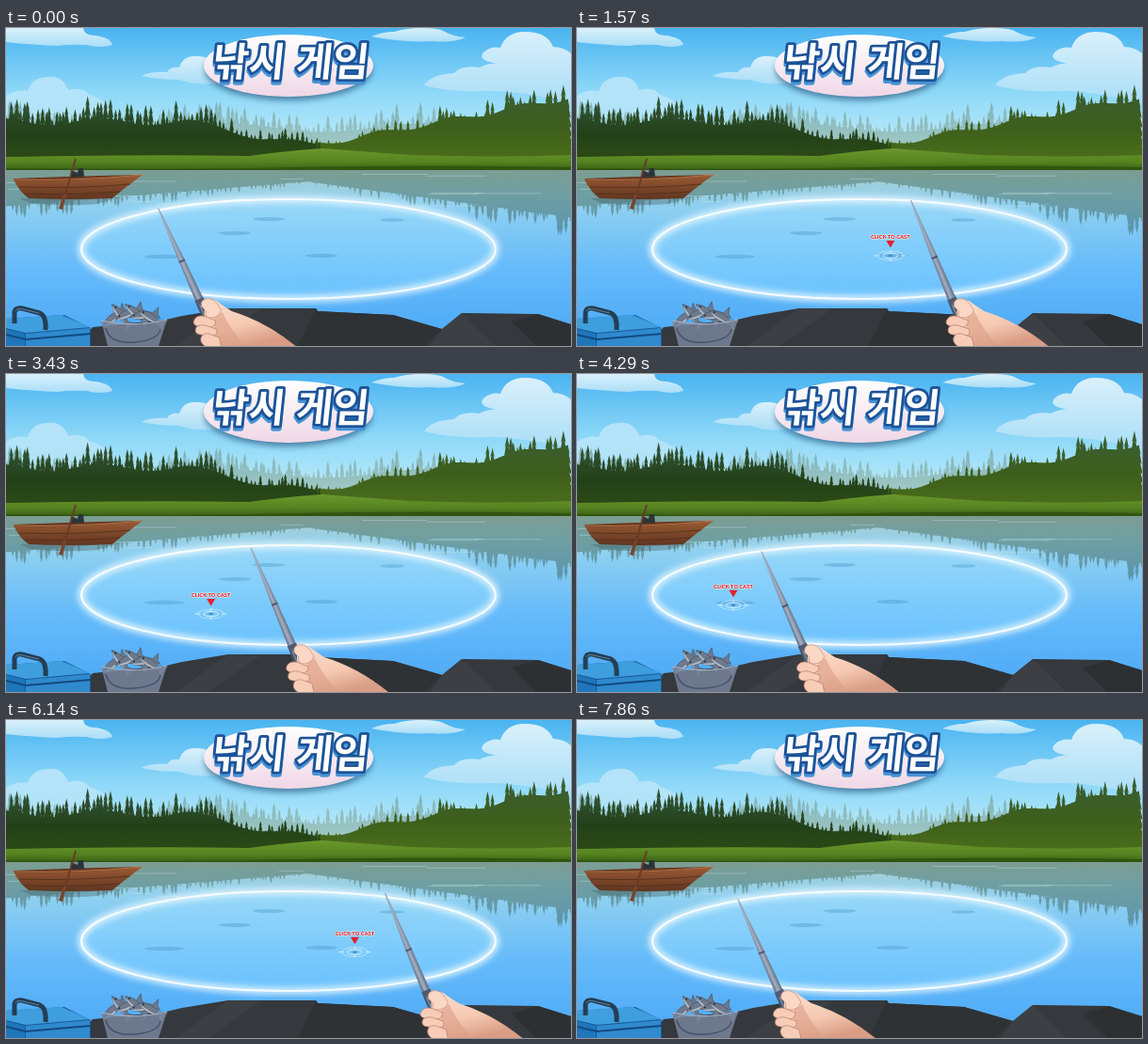
These frames come from a looping animation (600 by 338 pixels, 8.01 s). An HTML page:

```html
<!DOCTYPE html>
<html lang="ko">
<head>
<meta charset="utf-8">
<title>낚시 게임</title>
<style>
html, body { margin: 0; width: 100%; height: 100%; overflow: hidden; background: #62b8f8; }
svg { display: block; width: 100%; height: 100%; }
.title { font: 900 42px "Noto Sans CJK KR", "Noto Sans CJK", sans-serif; text-anchor: middle; stroke-linejoin: round; paint-order: stroke; }
.hint { font: 900 5.8px Lato, sans-serif; text-anchor: middle; fill: #e51f2b; stroke: #fff; stroke-width: .9px; stroke-linejoin: round; paint-order: stroke; }
</style>
</head>
<body>
<svg viewBox="0 0 600 338" preserveAspectRatio="none">
<defs>
  <linearGradient id="sky" x2="0" y2="1"><stop stop-color="#4ab4f1"/><stop offset=".45" stop-color="#8ed8f8"/><stop offset="1" stop-color="#d0f3fb"/></linearGradient>
  <linearGradient id="cloud" x2="0" y2="1"><stop stop-color="#d9f0fb"/><stop offset="1" stop-color="#a9def7"/></linearGradient>
  <linearGradient id="haze" x2="0" y2="1"><stop stop-color="#7eb0b6"/><stop offset="1" stop-color="#a9d0c9"/></linearGradient>
  <linearGradient id="pineL" x2="0" y2="1"><stop stop-color="#34563a"/><stop offset=".6" stop-color="#234119"/><stop offset="1" stop-color="#2b4a15"/></linearGradient>
  <linearGradient id="pineR" x2="0" y2="1"><stop stop-color="#3a5c35"/><stop offset=".6" stop-color="#3d5f1b"/><stop offset="1" stop-color="#4a6d1b"/></linearGradient>
  <linearGradient id="grass" x2="0" y2="1"><stop stop-color="#6c972d"/><stop offset=".6" stop-color="#55831f"/><stop offset="1" stop-color="#355c14"/></linearGradient>
  <linearGradient id="water" x2="0" y2="1"><stop stop-color="#a7cfd2"/><stop offset=".2" stop-color="#8fd0f0"/><stop offset=".55" stop-color="#66bbfa"/><stop offset="1" stop-color="#4ba8f6"/></linearGradient>
  <linearGradient id="mirror" x2="0" y2="1"><stop stop-color="#7c9d92"/><stop offset=".35" stop-color="#6f9fa2"/><stop offset="1" stop-color="#5a94ae"/></linearGradient>
  <linearGradient id="pool" x2="0" y2="1"><stop stop-color="#9adafa" stop-opacity=".75"/><stop offset="1" stop-color="#6ec5ff" stop-opacity=".8"/></linearGradient>
  <linearGradient id="plate" x2="0" y2="1"><stop stop-color="#fff"/><stop offset="1" stop-color="#f0d7e6"/></linearGradient>
  <linearGradient id="hull" x2="0" y2="1"><stop stop-color="#9c5b34"/><stop offset="1" stop-color="#5f3520"/></linearGradient>
  <linearGradient id="steel"><stop stop-color="#56637a"/><stop offset=".45" stop-color="#a4b0c2"/><stop offset="1" stop-color="#56637a"/></linearGradient>
  <linearGradient id="skin" x2=".5" y2="1"><stop stop-color="#fde0cf"/><stop offset=".6" stop-color="#f5c8b1"/><stop offset="1" stop-color="#d99c84"/></linearGradient>
  <filter id="glow" x="-10%" y="-25%" width="120%" height="150%"><feGaussianBlur stdDeviation="3"/></filter>
  <g id="fish">
    <path d="M-15 0Q-3-8 10-1L17-6 15 1 17 6 10 2Q-4 7-15 0Z" fill="#6e7a8c" stroke="#4c586a" stroke-width=".7"/>
    <path d="M-14 1Q-4 6 9 2Q-3 2-14 1Z" fill="#b3bcc8"/><circle cx="-10" cy="-1" r="1" fill="#26323d"/>
  </g>
</defs>

<rect width="600" height="150" fill="url(#sky)"/>
<g fill="url(#cloud)">
  <path d="M0 0H82Q83 8 94 8Q111 10 113 18Q100 22 86 18Q66 17 55 19Q31 18 0 15Z"/>
  <path d="M144 51Q153 46 171 47Q174 41 184 42Q188 29 202 30Q217 29 224 42L231 57Q205 63 184 55Q162 55 144 51Z"/>
  <path d="M0 72Q11 65 23 67Q28 52 45 52Q60 50 66 66Q82 62 88 71Q104 75 110 86V116H0Z" opacity=".6"/>
  <path d="M388 9Q400 4 412 4Q425 0 440 0Q460 0 466 4Q475 9 488 10Q475 16 452 14Q422 16 388 9Z"/>
  <path d="M444 61Q452 49 476 48Q483 39 503 42Q512 37 521 38Q500 34 507 26Q515 19 525 21Q531 4 551 4Q575 4 581 20Q592 20 600 27V79Q540 66 512 67Q475 69 444 61Z"/>
</g>
<path id="far" fill="url(#haze)"/>
<path id="right" fill="url(#pineR)"/>
<path id="left" fill="url(#pineL)"/>
<path d="M0 137Q160 134 258 136Q304 130 336 128Q390 132 430 135Q520 138 600 135V152H0Z" fill="url(#grass)"/>
<path d="M0 149Q180 151 310 148T600 148V152H0Z" fill="#30550f"/>

<rect y="151" width="600" height="187" fill="url(#water)"/>
<path id="mirrored" fill="url(#mirror)"/>
<path id="streaks" stroke="#c4e2e4" stroke-width="1" opacity=".4" fill="none"/>

<!-- boat -->
<path d="M14 181H116L97 187Q62 190 26 186Z" fill="#47656b" opacity=".4"/>
<path d="M8 161Q75 160 145 156Q127 169 113 181Q67 183 24 181Q14 174 8 161Z" fill="url(#hull)"/>
<path d="M8 160Q75 157 145 156Q80 164 8 162Z" fill="#6b3a22"/>
<path d="M14 169Q75 171 132 166M20 176Q75 178 121 174" fill="none" stroke="#55301c" stroke-width=".9"/>
<path d="M8 161Q75 163 145 156" fill="none" stroke="#b5784a"/>
<path d="M68 159L69 151 76 154 77 149H82L83 158Z" fill="#2b3438"/>
<path d="M74 139L61 184" stroke="#6b3a26" stroke-width="2"/><path d="M64 176L60 193 56 192 61 177Z" fill="#79452b"/>

<!-- casting area -->
<ellipse cx="300" cy="235" rx="220" ry="53" fill="url(#pool)"/>
<ellipse cx="300" cy="235" rx="220" ry="53" fill="none" stroke="#e3f6ff" stroke-width="8" opacity=".85" filter="url(#glow)"/>
<ellipse cx="300" cy="235" rx="220" ry="53" fill="none" stroke="#fff" stroke-width="2.2" opacity=".85"/>
<g fill="#4690c1" opacity=".35">
  <ellipse cx="243" cy="218" rx="17" ry="2"/><ellipse cx="279" cy="203" rx="17" ry="2"/>
  <ellipse cx="410" cy="204" rx="13" ry="1.8"/><ellipse cx="168" cy="243" rx="21" ry="2.2"/>
  <ellipse cx="335" cy="242" rx="17" ry="2.2"/>
</g>

<!-- title -->
<ellipse cx="300" cy="45" rx="89" ry="32" fill="#1d4a70" opacity=".6" filter="url(#glow)"/>
<ellipse cx="300" cy="40" rx="90" ry="33" fill="url(#plate)"/>
<g class="title" transform="translate(301 51) skewX(-6)">
  <text y="3" fill="#4a94d6" stroke="#4a94d6" stroke-width="6">낚시 게임</text>
  <text fill="#fff" stroke="#1c5398" stroke-width="5.5">낚시 게임</text>
</g>

<!-- shore -->
<path d="M76 338L92 318 170 310 187 306 236 298 329 298 331 301 411 305 463 320 484 303 565 304 600 315V338Z" fill="#35383c"/>
<path d="M329 298L331 301 411 305 463 320 445 338H310Z" fill="#2f3235"/>
<path d="M463 320L484 303 493 312 520 338H450ZM236 298L270 299 215 338H180Z" fill="#3c3f43"/>
<path d="M537 312L565 304 600 315V338H563Z" fill="#2d3033"/>

<!-- tackle box -->
<path d="M0 309L62 305 90 319V338H0Z" fill="#185a99"/>
<path d="M0 309L59 305 89 318 21 324 0 319Z" fill="#3f9ede"/>
<path d="M0 320L20 325V338H0Z" fill="#1f76ba"/><path d="M21 325L89 319V338H21Z" fill="#2f8ace"/>
<path d="M0 326L21 331 90 325" fill="none" stroke="#134a80" stroke-width="2"/>
<path d="M9 314V302Q10 297 17 298L36 303Q43 306 42 321" fill="none" stroke="#243e54" stroke-width="5" stroke-linejoin="round"/>
<path d="M10 301Q12 297 18 299L35 303" fill="none" stroke="#60849a"/>

<!-- bucket -->
<g id="catch"></g>
<path d="M101 311Q136 318 171 310L162 338H108Z" fill="#7a879f" opacity=".82"/>
<path d="M101 311Q136 319 171 310" fill="none" stroke="#a8b4c6"/>
<path d="M106 319Q110 336 136 334T164 320" fill="none" stroke="#46536a" stroke-width="1.5"/>

<g id="marker">
  <g fill="none" stroke="#e6f8ff" stroke-width=".8">
    <ellipse rx="14" ry="5" opacity=".6"/><ellipse rx="8" ry="2.8"/>
    <path d="M-17 0H-11M11 0H17M0-6V-3M0 3V6"/>
  </g>
  <ellipse rx="2.5" ry="1" fill="#3c8bbe"/>
  <path d="M-4.5-16H4.5L0-8.5Z" fill="#e51f2b"/>
  <text class="hint" y="-18">CLICK TO CAST</text>
</g>

<g id="arm">
  <g id="rod">
    <path d="M-4.8 48L-4.6 0-3.2-55-.6-117H.6L3.2-55 4.6 0 4.8 48Z" fill="url(#steel)"/>
    <path d="M-5-9H5V-4H-5ZM-3.4-55H3.4V-53H-3.4Z" fill="#4e5b72"/>
    <path d="M-5-4H5V48H-5Z" fill="#48566c"/><path d="M-2-3V48" stroke="#7d8a9e" stroke-width="1.5"/>
  </g>
  <path d="M4-5Q12-10 19-3L31 5Q67 16 99 42H15Q8 32 4 17Q0 5 4-5Z" fill="url(#skin)"/>
  <path d="M21 6Q28 22 45 42H18Q10 26 13 11Z" fill="#dc9f88" opacity=".6"/>
  <g fill="#f7cdb8" stroke="#bb7c68" stroke-width=".7">
    <path d="M-8 13Q-4 8 4 11L14 15Q14 22 7 22L-5 21Q-12 19-8 13Z"/>
    <path d="M-7 23Q-5 19 3 20L15 24Q17 31 10 31L-2 30Q-9 29-7 23Z"/>
    <path d="M-1 32Q1 28 7 29L18 33 20 43H4Q-4 38-1 32Z"/>
  </g>
  <path d="M1-7Q8-11 15-4L20 4Q17 12 9 12Q2 12 4 5L-1 0Q-2-5 1-7Z" fill="#fbd8c5" stroke="#c88d78" stroke-width=".7"/>
</g>
<path id="pointer" d="M122 320V328L124 326 125.3 329 126.7 328.3 125.4 325.6H128Z" fill="#fff" stroke="#222" stroke-width=".6"/>
</svg>

<script>
const LOOP = 8010, FRAMES = 56, STEP = LOOP / FRAMES;
const { sin, cos, abs, max, PI } = Math;
const el = id => document.getElementById(id);
const place = (id, transform) => el(id).setAttribute('transform', transform);
const show = (id, on) => { el(id).style.display = on ? '' : 'none'; };

function random(seed) {
  return () => (seed = seed * 16807 % 2147483647) / 2147483647;
}

// Ragged conifers over a solid bank; a negative height makes a reflection
function forest(id, from, to, base, bank, height, seed) {
  const rnd = random(seed), pt = (x, y) => `${x.toFixed(1)} ${y.toFixed(1)}`;
  let d = `M${from} ${base}`;
  for (let x = from; x <= to; x += 8) d += 'L' + pt(x, base - height(x) * bank);
  d += `L${to} ${base}Z`;
  for (let x = from; x <= to; x += 2.5 + rnd() * 3.5) {
    const h = height(x) * (.66 + rnd() * .34), w = 2 + abs(h) * .075;
    let right = '', left = '';
    for (let i = 1; i <= 6; i++) {
      const y = base - h + h * i / 6, r = w * (.2 + i / 7), notch = y - h * .03;
      right += 'L' + pt(x + r, y) + 'L' + pt(x + r * .5, notch);
      left = 'L' + pt(x - r * .5, notch) + 'L' + pt(x - r, y) + left;
    }
    d += 'M' + pt(x, base - h) + right + left + 'Z';
  }
  el(id).setAttribute('d', d);
}

forest('far', 0, 460, 138, .6, x => 54 + 8 * cos(x / 36), 41);
forest('left', 0, 335, 138, .62, x => 62 + 6 * cos((x - 100) / 17) - max(0, x - 190) * .31, 83);
forest('right', 325, 600, 138, .72, x => 18 + .26 * (x - 325) + 4 * sin(x / 12), 29);
forest('mirrored', 0, 600, 151, .68, x => -18 - max((x - 320) * .2, (320 - x) * .12), 57);

const rnd = random(17);
let streaks = '';
for (let i = 0; i < 16; i++) {
  streaks += `M${rnd() * 560} ${155 + rnd() * 40}h${20 + rnd() * 60}`;
}
el('streaks').setAttribute('d', streaks);

for (let i = 0; i < 6; i++) {
  el('catch').innerHTML += `<use href="#fish" transform="translate(${114 + i * 8} ${308 - 5 * sin(i * PI / 5)}) rotate(${i % 2 ? 55 - i * 5 : -40 + i * 8})"/>`;
}

// The hand circles twice per loop, with a slow sideways drift
function draw(now) {
  const t = Math.min(FRAMES - 1, Math.floor((now % LOOP + 8) / STEP)) * STEP;
  const a = 2 * PI * t / LOOP;

  const tipX = 291 - 18 * cos(a) - 115 * cos(2 * a - .25);
  const tipY = 183 + 9 * ((340 - tipX) / 185) ** 2;
  const gripX = tipX + 47, gripY = 296;
  const angle = Math.atan2(tipX - gripX, gripY - tipY) * 180 / PI;
  const reach = Math.hypot(tipX - gripX, gripY - tipY) / 117;
  place('arm', `translate(${gripX} ${gripY})`);
  place('rod', `rotate(${angle}) scale(1 ${reach})`);

  const turn = 2 * a - .17;
  place('marker', `translate(${263 - 8 * cos(a) - 109 * cos(turn)} ${248 - 8 * sin(turn)})`);
  show('marker', t > 420 && t < 6950);
  show('pointer', t > 6800 && t < 7200);
}

const start = performance.now();
function tick() {
  draw(performance.now() - start);
  requestAnimationFrame(tick);
}
tick();
</script>
</body>
</html>
```
